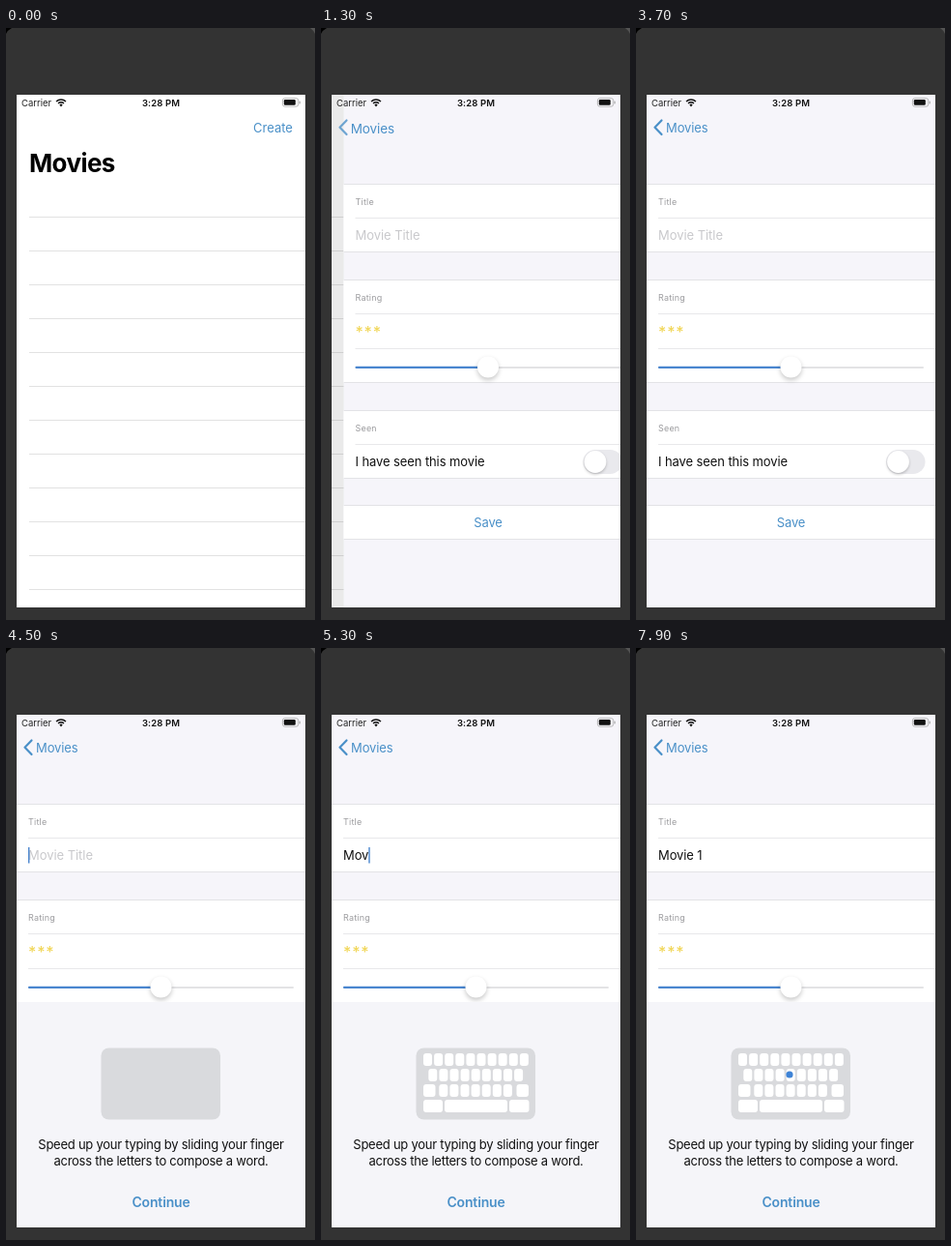
Write an HTML page with a canvas that moves like this. It is 320 px wide and 612 px high and loops after 8 s.

```html
<!DOCTYPE html>
<html lang="en">
<head>
<meta charset="utf-8">
<title>Movies</title>
<style>
  html, body { margin: 0; width: 100%; height: 100%; overflow: hidden; background: #333; }
  canvas { display: block; width: 320px; height: 612px; }
</style>
</head>
<body>
<canvas id="stage"></canvas>
<script>
const LOOP = 8000;
const BLUE = '#4a90c8', GROUP = '#f6f5fa', LINE = '#e3e3e6';
const SCREEN = { x: 11, y: 69, w: 299, h: 530 };
const PUSH_AT = 850, KEYBOARD_AT = 4080, FOCUS_AT = 4150, KEYS_AT = 4550;
const TYPED = [[5000, 'M'], [5100, 'Mo'], [5250, 'Mov'], [5450, 'Movi'], [5650, 'Movie'],
  [6800, 'Movie '], [7300, 'Movie 1']];
const SWIPE = [[159, 441], [131, 422], [143, 418], [173, 433], [205, 441], [200, 425]];
const SWIPE_START = 5800, SWIPE_PERIOD = 2000;

const canvas = document.getElementById('stage');
const ctx = canvas.getContext('2d');
const dpr = window.devicePixelRatio || 1;
canvas.width = 320 * dpr;
canvas.height = 612 * dpr;

const clamp = v => Math.max(0, Math.min(1, v));
const ramp = (t, from, length) => clamp((t - from) / length);
const mix = (a, b, p) => a + (b - a) * p;

function rect(x, y, w, h, color) {
  ctx.fillStyle = color;
  ctx.fillRect(x, y, w, h);
}

function pill(x, y, w, h, r, color) {
  ctx.fillStyle = color;
  ctx.beginPath();
  ctx.roundRect(x, y, w, h, r);
  ctx.fill();
}

function disc(x, y, r, color) {
  ctx.fillStyle = color;
  ctx.beginPath();
  ctx.arc(x, y, r, 0, 7);
  ctx.fill();
}

function text(str, x, y, size, color, { weight = 400, align = 'left', gap = 0 } = {}) {
  ctx.font = `${weight} ${size}px Inter, Roboto, sans-serif`;
  ctx.letterSpacing = gap + 'px';
  ctx.textAlign = align;
  ctx.fillStyle = color;
  ctx.fillText(str, x, y);
  return ctx.measureText(str).width;
}

function faded(alpha, draw) {
  if (alpha <= 0) return;
  ctx.save();
  ctx.globalAlpha *= alpha;
  draw();
  ctx.restore();
}

function shadowed(blur, dy, draw) {
  ctx.save();
  ctx.shadowColor = 'rgba(0,0,0,.22)';
  ctx.shadowBlur = blur * dpr;
  ctx.shadowOffsetY = dy * dpr;
  draw();
  ctx.restore();
}

// Critically damped spring, as in a navigation push
function pushAmount(t) {
  const s = Math.max(0, t - PUSH_AT) / 1000 * 11;
  return s > 8.2 ? 1 : 1 - (1 + s) * Math.exp(-s);
}

function drawBezel() {
  rect(0, 0, 320, 612, '#333');
  ctx.fillStyle = '#000';
  ctx.beginPath();
  ctx.moveTo(0, 0);
  ctx.lineTo(6, 0);
  ctx.quadraticCurveTo(2, 2, 0, 6);
  ctx.fill();
  ctx.fillStyle = '#555';
  ctx.beginPath();
  ctx.moveTo(320, 0);
  ctx.lineTo(315, 0);
  ctx.quadraticCurveTo(318, 2, 320, 6);
  ctx.fill();
}

function drawStatus() {
  text('Carrier', 16, 81, 9.5, '#222');
  text('3:28 PM', 160.5, 81, 9.5, '#111', { weight: 600, align: 'center', gap: .1 });
  ctx.strokeStyle = '#111';
  ctx.lineWidth = 1.5;
  for (const r of [4.2, 7]) {
    ctx.beginPath();
    ctx.arc(57, 81, r, -Math.PI * .75, -Math.PI * .25);
    ctx.stroke();
  }
  ctx.fillStyle = '#111';
  ctx.beginPath();
  ctx.moveTo(57, 81.5);
  ctx.arc(57, 81, 2.4, -Math.PI * .75, -Math.PI * .25);
  ctx.fill();
  ctx.strokeStyle = '#aaa';
  ctx.lineWidth = .8;
  ctx.beginPath();
  ctx.roundRect(286.4, 72.6, 16.4, 8.6, 2.4);
  ctx.stroke();
  pill(287.8, 74, 12, 5.8, 1.3, '#111');
  pill(303.6, 75.4, 1.2, 3, .6, '#aaa');
}

function drawList(push) {
  rect(SCREEN.x, SCREEN.y, SCREEN.w, SCREEN.h, '#fff');
  const shift = -push * 90;
  for (let y = 195; y < 599; y += 35) rect(24 + shift, y, 400, 1, '#e2e2e2');
  rect(SCREEN.x, SCREEN.y, SCREEN.w, SCREEN.h, `rgba(0,0,0,${.085 * push})`);
}

function section(top, bottom, dividers, heading) {
  rect(11, top, 299, bottom - top, '#fff');
  rect(11, top, 299, 1, LINE);
  rect(11, bottom - 1, 299, 1, LINE);
  for (const y of dividers) rect(23, y, 287, 1, '#e8e8ea');
  if (heading) text(heading, 23, top + 22, 9, '#9c9c9f', { gap: .2 });
}

function drawTitleField(t) {
  let value = '', since = FOCUS_AT;
  for (const [at, str] of TYPED) if (t >= at) [since, value] = [at, str];
  const width = value
    ? text(value, 23, 218.5, 13, '#111', { gap: -.1 })
    : (text('Movie Title', 23, 218.5, 13, '#c9c9cc', { gap: -.05 }), 0);
  if (t >= FOCUS_AT && (t - since) % 1000 < 550) rect(23 + width, 206, 1.4, 16.5, '#4a86cf');
}

function drawSlider() {
  pill(23, 350, 275, 2, 1, '#e3e3e5');
  pill(23, 349.8, 138, 2.2, 1, '#4a86cf');
  shadowed(5, 2.5, () => disc(160.5, 350.5, 11, '#fff'));
}

function drawForm(t) {
  rect(11, 69, 299, 530, GROUP);
  section(161, 232, [196], 'Title');
  drawTitleField(t);
  section(260, 367, [295, 331], 'Rating');
  text('***', 23, 320, 16, '#f1d759', { gap: .8, weight: 500 });
  drawSlider();
  section(395, 466, [430], 'Seen');
  text('I have seen this movie', 23, 453, 13, '#111', { gap: -.1 });
  pill(259, 436, 40.5, 25, 12.5, '#e9e9ed');
  shadowed(3, 1.5, () => disc(271.5, 448.5, 11.4, '#fff'));
  section(493, 529, []);
  text('Save', 160.5, 516, 13, BLUE, { align: 'center', gap: -.1 });
}

function drawNav(push) {
  faded(1 - push * 1.3, () => text('Create', 256, 107.5, 13, BLUE));
  const tint = clamp(push * 1.4);
  const color = `rgb(${mix(0, 74, tint)},${mix(0, 144, tint)},${mix(0, 200, tint)})`;
  const weight = Math.round(mix(7, 4, push * push)) * 100;
  text('Movies', mix(24, 31, push), mix(148.5, 107.5, push), mix(26, 13, push), color,
    { weight, gap: mix(-.6, -.1, push) });
  faded(ramp(push, .8, .2), () => {
    ctx.strokeStyle = BLUE;
    ctx.lineWidth = 2.2;
    ctx.lineCap = ctx.lineJoin = 'round';
    ctx.beginPath();
    ctx.moveTo(26.5, 95.5);
    ctx.lineTo(19.5, 102.8);
    ctx.lineTo(26.5, 110);
    ctx.stroke();
  });
}

function drawKeys() {
  const key = (x, row, w = 9) => pill(x, 419 + row * 16, w, 13, 3, '#fff');
  for (let i = 0; i < 10; i++) key(106 + i * 11.1, 0);
  for (let i = 0; i < 9; i++) key(111.3 + i * 11.1, 1);
  for (let i = 0; i < 7; i++) key(122.3 + i * 11.1, 2);
  key(106, 2, 12.5);
  key(202.5, 2, 12.5);
  key(106, 3, 20);
  key(128, 3, 65);
  key(195, 3, 20.5);
}

// Catmull-Rom curve through the swiped letters
function swipePoint(u) {
  const i = Math.min(SWIPE.length - 2, Math.floor(u)), f = u - i;
  const at = k => SWIPE[Math.max(0, Math.min(SWIPE.length - 1, k))];
  const [a, b, c, d] = [at(i - 1), at(i), at(i + 1), at(i + 2)];
  return [0, 1].map(k => b[k] + .5 * f * (c[k] - a[k]
    + f * (2 * a[k] - 5 * b[k] + 4 * c[k] - d[k] + f * (3 * (b[k] - c[k]) + d[k] - a[k]))));
}

function drawSwipe(t) {
  if (t < SWIPE_START) return;
  const s = (t - SWIPE_START) % SWIPE_PERIOD;
  const progress = ms => clamp((ms - 200) / 900) * 5;
  const along = ms => swipePoint(mix(0, 1, clamp(ms < 200 ? 0 : (ms - 200) / 150))
    + 4 * clamp((ms - 350) / 500));
  faded(Math.min(ramp(s, 0, 90), 1 - ramp(s, 1050, 250)), () => {
    ctx.strokeStyle = '#c6c7cb';
    ctx.lineCap = 'round';
    const steps = 24, span = 230;
    for (let i = 0; i < steps; i++) {
      ctx.lineWidth = mix(.8, 4, i / steps);
      ctx.beginPath();
      ctx.moveTo(...along(s - span * (1 - i / steps)));
      ctx.lineTo(...along(s - span * (1 - (i + 1) / steps)));
      ctx.stroke();
    }
    disc(...along(s), 3.6, '#3f83d6');
  });
}

function drawKeyboard(t) {
  const p = ramp(t, KEYBOARD_AT, 400);
  if (!p) return;
  ctx.save();
  ctx.translate(0, 232 * (1 - p) ** 4);
  rect(11, 366, 299, 233, '#f5f5f9');
  pill(98.5, 413.5, 123.5, 74, 8, '#d9dadd');
  faded(ramp(t, KEYS_AT, 350), drawKeys);
  drawSwipe(t);
  const center = { align: 'center', gap: -.25 };
  text('Speed up your typing by sliding your finger', 160.5, 518, 13, '#111', center);
  text('across the letters to compose a word.', 160.5, 535, 13, '#111', center);
  text('Continue', 160.5, 578, 14, BLUE, { weight: 600, align: 'center', gap: -.15 });
  ctx.restore();
}

function draw(t) {
  const push = pushAmount(t);
  ctx.setTransform(dpr, 0, 0, dpr, 0, 0);
  drawBezel();
  ctx.save();
  ctx.beginPath();
  ctx.rect(SCREEN.x, SCREEN.y, SCREEN.w, SCREEN.h);
  ctx.clip();
  drawList(push);
  if (push > 0) {
    ctx.save();
    ctx.translate(SCREEN.w * (1 - push), 0);
    drawForm(t);
    ctx.restore();
  }
  drawNav(push);
  drawStatus();
  drawKeyboard(t);
  ctx.restore();
}

function frame() {
  draw(performance.now() % LOOP);
  requestAnimationFrame(frame);
}
frame();
</script>
</body>
</html>
```
